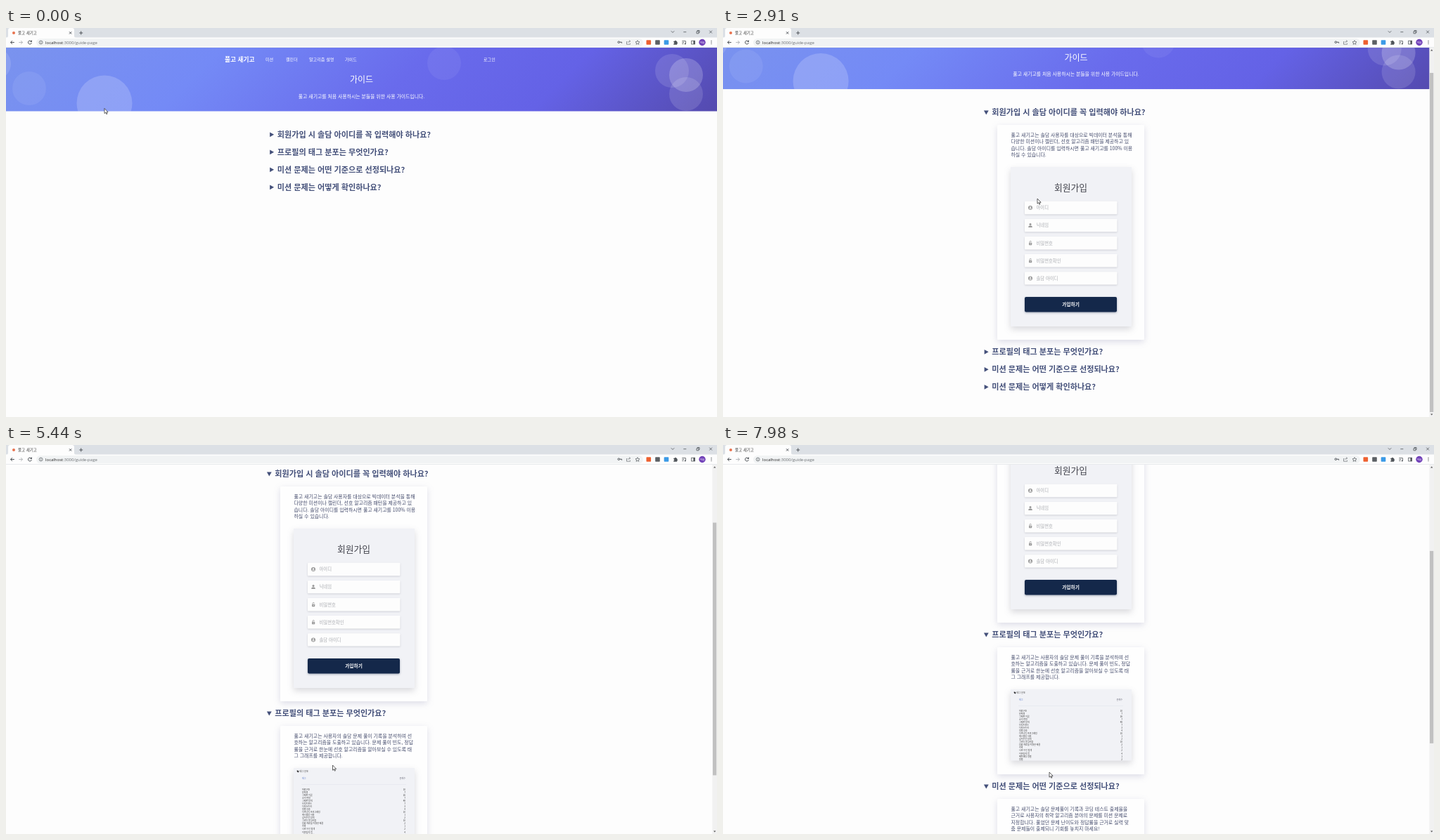
Write an HTML page that moves like this. It is 1011 px wide and 554 px high and loops after 8 s.

```html
<!DOCTYPE html>
<html lang="ko">
<head>
<meta charset="utf-8">
<title>가이드</title>
<style>
html, body { margin: 0; width: 100%; height: 100%; overflow: hidden; background: #fdfdfd; }
svg { display: block; }
text { font-family: "Noto Sans CJK KR", "Noto Sans KR", "Noto Sans", sans-serif; white-space: pre; }
.card { fill: #fefefe; filter: drop-shadow(0 3px 5px #50508c30); }
.shot { fill: #f1f2f6; filter: drop-shadow(0 4px 5px #50506438); }
.field { fill: #fdfdfd; filter: drop-shadow(0 1px .8px #50506438); }
.line { fill: none; stroke: #50555a; stroke-width: 1; }
</style>
</head>
<body>
<svg id="stage" width="1011" height="554" viewBox="0 0 1011 554"></svg>
<script>
const LOOP = 8000, SITE = '풀고 새기고', JUDGE = '솔담';

// Text placed by its vertical centre
const text = (x, cy, size, str, fill, extra = '') =>
  `<text x="${x}" y="${(cy + size * .37).toFixed(2)}" font-size="${size}" fill="${fill}" ${extra}>${str}</text>`;
const rect = (x, y, w, h, attrs) => `<rect x="${x}" y="${y}" width="${w}" height="${h}" ${attrs}/>`;
const dot = (x, y, r, attrs) => `<circle cx="${x}" cy="${y}" r="${r}" ${attrs}/>`;
const path = (d, attrs = 'class="line"') => `<path d="${d}" ${attrs}/>`;
const MID = 'text-anchor="middle"', END = 'text-anchor="end"', BOLD = 'font-weight="700"';

// Page header: [x, y, radius, opacity]
const bubbles = [[-16, 51, 23, .13], [33, 86, 24, .07], [140, 107, 39.5, .18], [623, 50, 24, .06],
  [947, 61, 24, .12], [967, 67, 24, .2], [967, 94, 24, .13]];

const nav = [[365.5, '미션'], [394.5, '캘린더'], [427.5, '알고리즘 설명'], [478.5, '가이드'], [675.5, '로그인']];
const heading = text(307.5, 45, 8.7, SITE, '#fff', BOLD) +
  nav.map(([x, s]) => text(x, 45, 6.1, s, '#fff')).join('') +
  text(502, 74, 12, '가이드', '#fff', MID) +
  text(502, 97, 6.87, `${SITE}를 처음 사용하시는 분들을 위한 사용 가이드입니다.`, '#fff', MID);

// Field icons
const icons = {
  badge: dot(437, 0, 3, 'fill="#999"') + dot(437, -.8, 1, 'fill="#fff"') + path('M435.2 1.8a1.8 1.3 0 0 1 3.6 0z', 'fill="#fff"'),
  user: dot(437, -1.5, 1.5, 'fill="#999"') + path('M434.3 3v-1a2 1.7 0 0 1 2-1.7h1.4a2 1.7 0 0 1 2 1.7v1z', 'fill="#999"'),
  lock: rect(435, -.5, 4.2, 3.5, 'rx=".6" fill="#999"') + path('M436-.5v-1a1.2 1.3 0 0 1 2.4 0', 'fill="none" stroke="#999" stroke-width=".8"') +
    dot(437.1, 1.2, .6, 'fill="#fff"')
};

const signup = () => rect(409, 78, 172, 227, 'class="shot"') +
  text(494.5, 107, 12.8, '회원가입', '#45464f', MID) +
  [['badge', '아이디'], ['user', '닉네임'], ['lock', '비밀번호'], ['lock', '비밀번호확인'], ['badge', `${JUDGE} 아이디`]]
    .map(([icon, label], i) => `<g transform="translate(0 ${136 + i * 25.1})">` +
      rect(429, -9.2, 131.5, 18.4, 'rx="1" class="field"') + icons[icon] +
      text(445.5, 0, 6.35, label, '#a9abb0') + '</g>').join('') +
  rect(429, 263, 131, 21.5, 'rx="2" fill="#14284a" style="filter:drop-shadow(0 1px 1.5px #14284a60)"') +
  text(494.5, 273.7, 6.7, '가입하기', '#fff', MID + ' ' + BOLD);

const tags = ['자료구조', '문자열', '그래프 이론', '소수 판정', '그래프 탐색', '브루트포스', '다익스트라', '정렬 응용',
  '다이나믹 프로그래밍', '해시맵을 사용', '깊이우선 탐색', '그리디 알고리즘', '집합 자료를 이용한 해결', '수학',
  '너비 우선 탐색', '이분탐색 법', '백트래킹 정렬', '정렬'];
const counts = [10, 7, 26, 7, 48, 7, 3, 4, 10, 1, 2, 10, 2, 1, 2, 4, 1, 2];
const tagTable = () => rect(409, 78, 172, 101.5, 'class="shot"') +
  path('M413.7 81.5h1.5l1.5 1.6-1.3 1.3-1.7-1.5z', 'fill="#333"') +
  text(417.3, 83, 3.2, '태그 분포', '#444') +
  text(421, 93, 3.1, '태그', '#5577cc') + text(568, 93, 3.1, '문제수', '#667', END) +
  path('M420 101.5H569', 'stroke="#dfe1e8" stroke-width=".5"') +
  tags.map((s, i) => text(421, 108.5 + i * 4.06, 3, s, '#333') +
    text(568, 108.5 + i * 4.06, 3, counts[i], '#333', END)).join('');

const guides = [
  { title: `회원가입 시 ${JUDGE} 아이디를 꼭 입력해야 하나요?`, room: 316, art: signup, openAt: 1800, lines: [
    `${SITE}는 ${JUDGE} 사용자를 대상으로 빅데이터 분석을 통해`,
    '다양한 미션이나 캘린더, 선호 알고리즘 패턴을 제공하고 있',
    `습니다. ${JUDGE} 아이디를 입력하시면 ${SITE}를 100% 이용`,
    '하실 수 있습니다.'] },
  { title: '프로필의 태그 분포는 무엇인가요?', room: 191, art: tagTable, openAt: 4900, lines: [
    `${SITE}는 사용자의 ${JUDGE} 문제 풀이 기록을 분석하여 선`,
    '호하는 알고리즘을 도출하고 있습니다. 문제 풀이 빈도, 정답',
    '률을 근거로 한눈에 선호 알고리즘을 알아보실 수 있도록 태',
    '그 그래프를 제공합니다.'] },
  { title: '미션 문제는 어떤 기준으로 선정되나요?', room: 234.5, art: () => '', openAt: 7450, lines: [
    `${SITE}는 ${JUDGE} 문제풀이 기록과 코딩 테스트 출제율을`,
    '근거로 사용자의 취약 알고리즘 분야의 문제를 미션 문제로',
    '지정합니다. 풀었던 문제 난이도와 정답률을 근거로 실력 맞',
    '춤 문제들이 출제되니 기회를 놓치지 마세요!'] },
  { title: '미션 문제는 어떻게 확인하나요?', room: 0, art: () => '', openAt: Infinity, lines: [] }
];

const guideMarkup = g => '<g class="guide">' +
  path('M-2.7-3.4L3.3 0L-2.7 3.4z', 'class="mark" fill="#44507a"') +
  text(382.3, 0, 11.1, g.title, '#44507a', BOLD) +
  '<g class="panel">' + rect(390, 18, 209, Math.max(0, g.room - 10), 'rx="1" class="card"') +
  g.lines.map((s, i) => text(409.5, 32.3 + i * 9.5, 6.9, s, '#444b6c')).join('') + g.art() + '</g></g>';

const browser = rect(0, 0, 1011, 14, 'fill="#dce0e5"') +
  path('M0 14q3 0 3-3V3q0-3 3-3H94q3 0 3 3v8q0 3 3 3z', 'fill="#fdfdfd"') +
  rect(0, 13.5, 1011, 14.5, 'fill="#fdfdfd"') + rect(0, 27.3, 1011, .7, 'fill="#dfe2e6"') +
  rect(43, 15.2, 863, 10.8, 'rx="5.4" fill="#f1f3f4"') +
  dot(11, 7, 2, 'fill="#e8734f"') + text(17, 6.6, 5.5, SITE, '#444') +
  path('M90 5.3l3.2 3.2m0-3.2L90 8.5M104.2 7h5m-2.5-2.5v5') +
  path('M945.8 4.3l2.2 2.2 2.2-2.2M963.3 5.7h4M982 4.8h3v3h-3zM983 4.5v-1h3v3h-1M1000.2 3.7l3.8 3.8m0-3.8l-3.8 3.8', 'class="line" style="stroke-width:.8"') +
  path('M11.8 20.5H6.5m2.4-2.4l-2.4 2.4 2.4 2.4') +
  path('M18.3 20.5h5.3m-2.4-2.4l2.4 2.4-2.4 2.4', 'class="line" style="stroke:#b5b8bb"') +
  path('M36 19a2.5 2.5 0 1 0 .4 2.2M36.5 17.6v2h-2') +
  dot(49.6, 20.5, 2.4, 'class="line" style="stroke-width:.7"') + path('M49.6 20.2v1.6m0-2.9v.6', 'class="line" style="stroke-width:.7"') +
  text(56, 20.5, 6, 'localhost<tspan fill="#6a6e72">:3000/guide-page</tspan>', '#222', 'style="font-family:\'Open Sans\',\'Noto Sans\',sans-serif"') +
  dot(871.3, 20.2, 1.3, 'class="line"') + path('M872.6 20.2h3v1.5') +
  path('M883.5 19.5h-1v3.7h5v-1.4m-3-1q.5-2 3-2m-1.2-1.3l1.4 1.3-1.4 1.3', 'class="line" style="stroke-width:.6"') +
  path('M898 17.6l.9 1.9 2.1.3-1.5 1.4.4 2.1-1.9-1-1.9 1 .4-2.1-1.5-1.4 2.1-.3z', 'class="line" style="stroke-width:.7"') +
  [[910.5, '#ee6130'], [923.2, '#5c6064'], [935.7, '#3b9ae6']].map(([x, c]) => rect(x, 17.2, 6.6, 6.6, `rx=".8" fill="${c}"`)).join('') +
  path('M949.3 18.7h1.5a1.2 1.2 0 0 1 2.3 0h1.1v1.5a1.2 1.2 0 0 1 0 2.3v1.2h-4.9v-1.5a1 1 0 0 0 0-2z', 'fill="#50555a"') +
  path('M961.3 18.5h5m-5 2h3m-3 2h2.2M966.5 18.5v3.7', 'class="line" style="stroke-width:.8"') + dot(965.8, 22.4, 1, 'fill="#50555a"') +
  rect(974.7, 18.2, 4.8, 4.8, 'class="line" style="stroke-width:.8"') + rect(977.4, 18, 2.2, 5, 'fill="#50555a"') +
  dot(990, 20.5, 4.7, 'fill="#7040b8"') + text(990, 20.5, 3.6, '하늘', '#fff', MID) +
  [18.4, 20.5, 22.6].map(y => dot(1003, y, .65, 'fill="#50555a"')).join('');

stage.innerHTML = `<linearGradient id="sky" gradientUnits="userSpaceOnUse" x1="230" y1="-202" x2="781" y2="349">
  <stop offset="0" stop-color="#7a93ee"/><stop offset=".28" stop-color="#748af6"/><stop offset=".55" stop-color="#696bec"/>
  <stop offset=".76" stop-color="#6462e6"/><stop offset="1" stop-color="#544aae"/></linearGradient>
  <clipPath id="band">${rect(0, 28, 1011, 90.7, '')}</clipPath>
  <g id="page"><g clip-path="url(#band)">${rect(0, 28, 1011, 90.7, 'fill="url(#sky)"')}
  ${bubbles.map(([x, y, r, a]) => dot(x, y, r, `class="bubble" fill="#fff" opacity="${a}"`)).join('')}</g>
  <g id="content">${heading}${guides.map(guideMarkup).join('')}</g></g>
  <g id="bar">${rect(1004.3, 28, 6.7, 526, 'fill="#f1f1f1"')}<rect id="thumb" x="1005" width="5.2" fill="#c1c1c1"/>
  ${path('M1006 32.6l1.7-2 1.7 2zM1006 549.6l1.7 2 1.7-2z', 'fill="#555"')}</g>${browser}
  <g id="cursor" stroke="#222" stroke-width=".7" fill="#fff" stroke-linejoin="round">
  ${path('M0 0V7.2L1.7 5.7 2.8 8.2 4 7.7 2.9 5.3H5.1Z', 'id="arrow"')}
  ${path('M-.5 5.6V.8a.8.8 0 0 1 1.6 0V3.6l3 .6q1.3.3 1.2 1.6l-.5 2.2-.6 1.4H.3L-2.6 6.3q-.3-1.1.9-.9z', 'id="hand"')}</g>`;

const marks = stage.querySelectorAll('.mark'), panels = stage.querySelectorAll('.panel');
const groups = stage.querySelectorAll('.guide'), circles = stage.querySelectorAll('.bubble');
const byId = id => document.getElementById(id);
const move = (el, x, y, more = '') => el.setAttribute('transform', `translate(${x} ${y})${more}`);

// Pointer tip: [ms, x, y]; scroll offset: [ms, y]
const pointer = [[40, 140, 114.5], [370, 300, 150], [600, 300, 150], [1400, 445.5, 158], [2300, 445.5, 158],
  [2750, 447, 243], [3400, 447, 243], [4150, 485, 387], [4350, 485, 387], [4750, 464.5, 456], [5900, 464.5, 456],
  [6250, 470.5, 423], [6450, 470.5, 423], [7100, 466, 484], [7550, 466, 484], [7850, 464, 466]];
const scrolling = [[2300, 0], [2550, 31.5], [5150, 31.5], [5400, 110.5], [5480, 110.5], [5900, 222.5]];

function along(keys, t, k) {
  const i = keys.findIndex(key => key[0] > t);
  if (i < 0) return keys[keys.length - 1][k];
  if (i === 0) return keys[0][k];
  const a = keys[i - 1], b = keys[i], p = (t - a[0]) / (b[0] - a[0]);
  return a[k] + (b[k] - a[k]) * p * p * (3 - 2 * p);
}

function draw(t) {
  const scroll = along(scrolling, t, 1), x = along(pointer, t, 1), tip = along(pointer, t, 2);
  const overflow = t >= guides[0].openAt;
  let y = 151.5, last = y, hover = false;
  guides.forEach((g, i) => {
    const open = t >= g.openAt;
    move(groups[i], 0, y);
    move(marks[i], 374.3, .3, open ? ' rotate(90)' : '');
    panels[i].style.display = open ? '' : 'none';
    hover ||= x > 367 && x < 640 && Math.abs(tip - y + scroll) < 9;
    last = y;
    y += 25 + (open ? g.room : 0);
  });
  move(byId('page'), 0, -scroll);
  move(byId('content'), overflow ? 0 : 3.5, 0);
  circles.forEach((c, i) => c.setAttribute('cx', bubbles[i][0] * (overflow ? 1004.3 / 1011 : 1)));

  const scale = 512 / (last + 15);
  byId('bar').style.display = overflow ? '' : 'none';
  byId('thumb').setAttribute('y', 35 + scroll * scale);
  byId('thumb').setAttribute('height', 526 * scale);

  move(byId('cursor'), x, tip);
  byId('arrow').style.display = hover ? 'none' : '';
  byId('hand').style.display = hover ? '' : 'none';
}

const start = performance.now();
function tick() {
  draw((performance.now() - start) % LOOP);
  requestAnimationFrame(tick);
}
tick();
</script>
</body>
</html>
```
